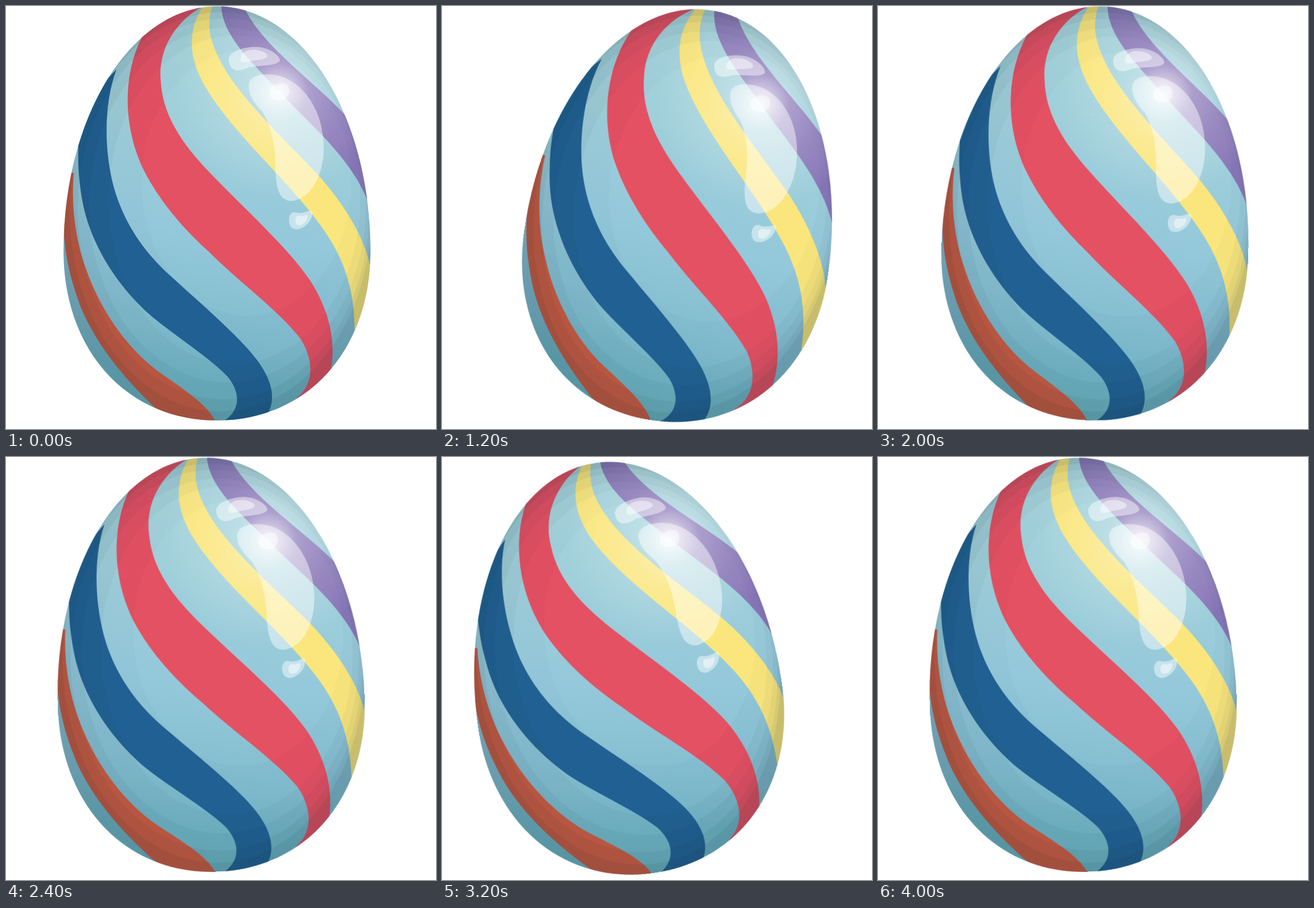
Animation of 755x742 px, one loop 4.2 s. Source, as an HTML page:

```html
<!DOCTYPE html>
<html lang="en">
<head>
<meta charset="utf-8">
<title>Rocking egg</title>
<style>
  html, body { margin: 0; width: 100%; height: 100%; overflow: hidden; background: #fff; }
  svg { display: block; width: 100%; height: 100%; }
  #egg { transform-origin: 381px 721px; }
</style>
</head>
<body>
<svg viewBox="0 0 755 742">
  <defs>
    <linearGradient id="shell" gradientUnits="userSpaceOnUse" x1="430" y1="0" x2="330" y2="727">
      <stop offset="0" stop-color="#a9d5dc"/>
      <stop offset=".3" stop-color="#9fcfda"/>
      <stop offset=".56" stop-color="#93c8da"/>
      <stop offset=".74" stop-color="#86bfd1"/>
      <stop offset=".88" stop-color="#72b6c7"/>
      <stop offset="1" stop-color="#69b2c1"/>
    </linearGradient>
    <radialGradient id="glow" gradientUnits="userSpaceOnUse" cx="480" cy="150" r="185">
      <stop offset="0" stop-color="#fff" stop-opacity=".85"/>
      <stop offset=".12" stop-color="#fff" stop-opacity=".62"/>
      <stop offset=".28" stop-color="#fff" stop-opacity=".3"/>
      <stop offset=".55" stop-color="#fff" stop-opacity=".15"/>
      <stop offset="1" stop-color="#fff" stop-opacity="0"/>
    </radialGradient>
    <clipPath id="outline"><path id="outlinePath"/></clipPath>
  </defs>
  <g id="egg">
    <g clip-path="url(#outline)">
      <rect width="755" height="742" fill="url(#shell)"/>
      <path fill="#cb5d43" d="M119 293C114 350 122 410 140 460C168 540 215 600 262 637C310 672 350 695 367 727L340 745L262 705C215 660 160 600 130 525C112 475 104 440 101 390L90 290Z"/>
      <path fill="#226294" d="M194 111C170 175 172 265 193 330C211 385 242 430 285 470C342 522 410 580 440 620C468 657 475 690 458 718L440 740L384 727C412 708 412 678 389 650C352 612 290 575 245 535C185 478 143 405 132 330C128 300 126 280 127 248L110 200Z"/>
      <path fill="#e45162" d="M345 1C300 25 265 75 272 135C277 205 325 260 375 310C430 366 500 430 535 483C568 535 580 590 570 640L560 690L510 688C540 665 542 625 518 585C480 535 410 485 355 430C300 380 262 330 238 280C205 205 206 120 238 56L260 -10Z"/>
      <path fill="#fae67c" d="M345 2C320 42 320 85 345 133C378 195 450 265 500 321C560 390 612 450 612 568L660 520L639 455C628 400 585 335 540 288C495 240 430 180 390 120C360 72 350 38 362 0Z"/>
      <path fill="#8876b7" d="M378 0C380 60 450 115 500 171C550 222 610 275 637 347L660 250L597 193C545 135 455 75 421 8L400 -9Z"/>
      <g id="shade" fill-rule="evenodd"></g>
      <circle cx="480" cy="150" r="185" fill="url(#glow)"/>
    </g>
    <g fill="#fff" fill-opacity=".46">
      <path d="M391 95C390 78 425 70 445 72C465 75 481 87 481 96C475 106 440 104 425 108C410 116 392 116 391 95Z"/>
      <path d="M412 92C414 80 425 76 440 77C452 79 460 84 459 89C452 96 435 94 425 98C415 100 411 98 412 92Z"/>
      <path d="M426 142C426 125 440 120 462 120C500 121 530 150 545 185C560 218 562 265 550 295C540 325 520 341 500 342C480 341 474 320 473 285C473 240 465 210 450 185C437 170 427 160 426 142Z"/>
      <path d="M463 152C463 143 470 139 475 138C483 134 495 134 497 146C499 158 490 165 480 165C470 165 463 161 463 152Z"/>
      <path d="M497 378C496 365 503 361 508 362C520 366 530 358 537 359C540 368 533 382 522 388C510 395 498 392 497 378Z"/>
      <path d="M508 377C507 370 512 367 517 368C523 369 527 366 529 366C530 374 526 381 519 384C512 386 508 383 508 377Z"/>
    </g>
  </g>
</svg>
<script>
  const byId = id => document.getElementById(id);
  const outline = 'M370.5 .5C518.5 .5 640 190 640 430C640 602 530.5 727 370.5 727' +
    'C210.5 727 101 602 101 430C101 190 222.5 .5 370.5 .5Z';
  byId('outlinePath').setAttribute('d', outline);

  // Each band darkens the shell outside one ellipse: cx, cy, rx, ry, opacity.
  const bands = [
    [422, 310, 184, 233, .02],
    [401, 340, 221, 288, .035],
    [389, 349, 243, 311, .045],
    [382, 356, 256, 334, .055],
    [377, 361, 265, 350, .07]
  ];
  byId('shade').innerHTML = bands.map(([cx, cy, rx, ry, alpha]) =>
    `<path fill="#10242c" fill-opacity="${alpha}" d="${outline}M${cx - rx} ${cy}` +
    `a${rx} ${ry} 0 1 0 ${2 * rx} 0a${rx} ${ry} 0 1 0 ${-2 * rx} 0Z"/>`).join('');

  // Start time in ms and tilt in steps of two degrees.
  const loop = 4200;
  const tilts = [
    [0, 0], [400, 1], [600, 2], [800, 3], [1200, 4], [1400, 3], [1600, 2], [2000, 1],
    [2200, 0], [2400, -1], [2800, -2], [3000, -3], [3200, -4], [3600, -3], [3800, -2],
    [4000, -1], [loop, -1]
  ];
  byId('egg').animate(tilts.map(([start, step]) => ({
    offset: start / loop,
    easing: 'step-end',
    transform: `translateY(${.08 * step * step}px) rotate(${2 * step}deg)`
  })), { duration: loop, iterations: Infinity });
</script>
</body>
</html>
```
